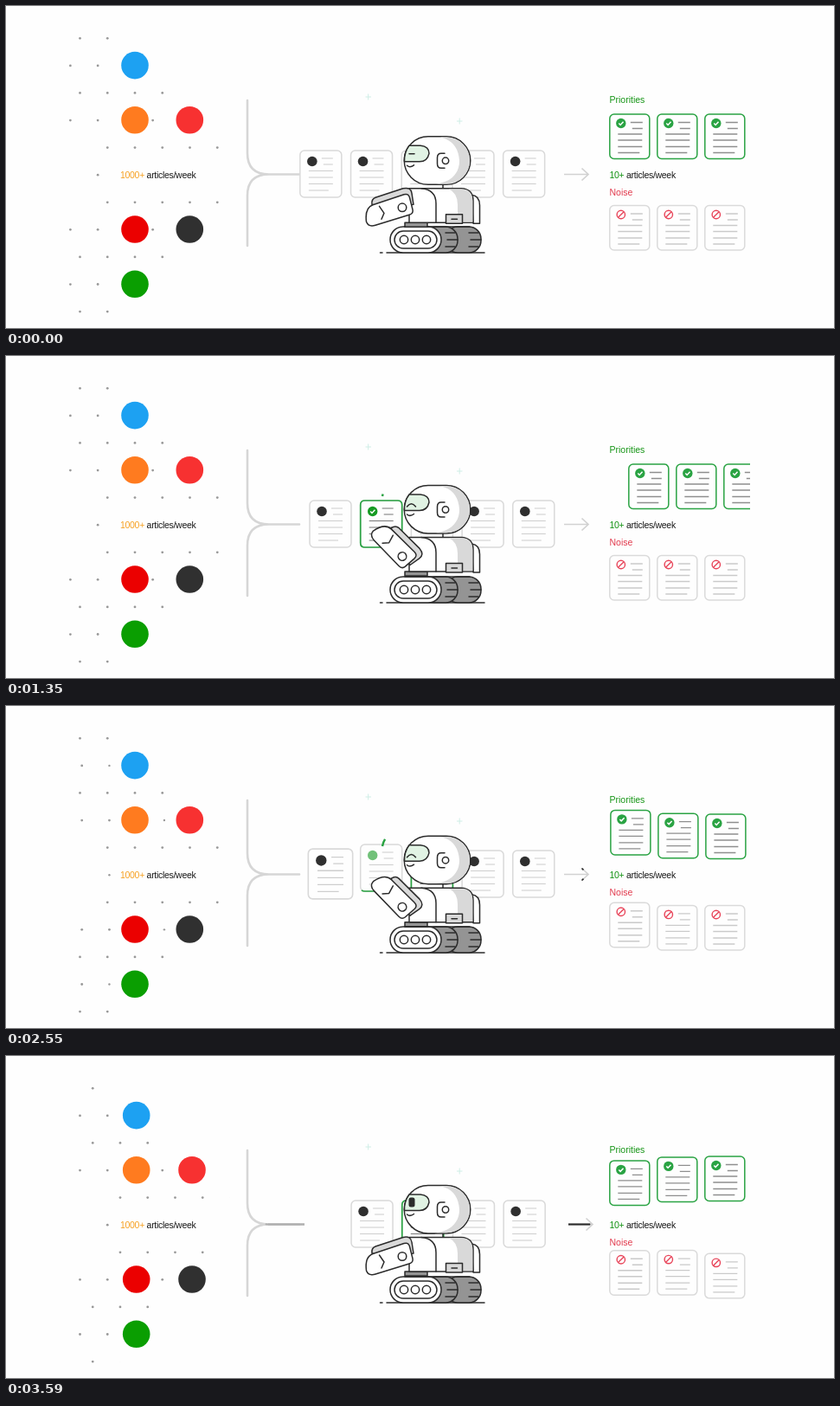
These frames come from a looping animation (957x372 px, 3.69 s). An HTML page:

```html
<!DOCTYPE html>
<html lang="en">
<head>
<meta charset="utf-8">
<title>Article sorting robot</title>
<style>
html, body { margin: 0; width: 100%; height: 100%; overflow: hidden; background: #fefefe; }
svg { display: block; width: 957px; height: 372px; }
text { font: 10.5px "Liberation Sans", Arial, sans-serif; }
.count { letter-spacing: -.3px; fill: #1a1a1a; }
.ink { stroke: #2b2b2b; stroke-width: 1.5; stroke-linejoin: round; stroke-linecap: round; fill: none; }
.white { fill: #fff; }
.grey { fill: #d9d9d9; }
.dark { fill: #949494; }
.shade { fill: #d9d9d9; stroke: none; }
.line { fill: none; }
</style>
</head>
<body>
<svg viewBox="0 0 957 372">
  <defs><clipPath id="edge"><rect x="680" y="90" width="180" height="110"/></clipPath></defs>

  <g id="dots" fill="#999"></g>
  <g id="sources"></g>

  <text class="count" x="132" y="199"><tspan fill="#f7a325">1000+</tspan> articles/week</text>
  <text x="697.5" y="112" fill="#149414">Priorities</text>
  <text class="count" x="697.5" y="199"><tspan fill="#149414">10+</tspan> articles/week</text>
  <text x="697.5" y="219" fill="#e23b4e">Noise</text>

  <path class="line" stroke="#d6d6d6" stroke-width="2.6" stroke-linecap="round"
    d="M279 109V170Q279 194.5 304 194.5H339M279 277V219Q279 194.5 304 194.5H339"/>
  <g id="inflow" class="line" stroke="#b0b0b0" stroke-width="2">
    <path d="M279 108V170Q279 194.5 304 194.5H345"/>
    <path d="M279 278V219Q279 194.5 304 194.5H345"/>
  </g>
  <g id="arrow" class="line" stroke-width="1.7">
    <path stroke="#d2d2d2" d="M645 194.5H673M665.5 187.5L673 194.5L665.5 201.5"/>
    <g id="outflow" stroke="#2b2b2b">
      <path d="M645 194.5H673L665.5 187.5"/>
      <path d="M645 194.5H673L665.5 201.5"/>
    </g>
  </g>
  <path stroke="#cfeee6" d="M415.5 105H422M418.7 101.5V108.5M521 133H527.5M524.2 129.5V136.5"/>

  <g id="belt"></g>
  <path id="beam" class="line" stroke="#2aa343" stroke-width="2.5" pathLength="1"
    d="M435 162C437 152 442 147.5 452 147.5H471"/>

  <g id="robot">
    <path class="ink" d="M440 285H553M432.5 285H435"/>
    <g id="treads"></g>
    <rect class="ink white" x="444" y="255" width="59" height="30" rx="15"/>
    <rect class="ink white" x="449" y="260" width="49" height="20" rx="10"/>
    <g class="ink"><circle cx="460" cy="270" r="4.7"/><circle cx="473" cy="270" r="4.7"/><circle cx="486" cy="270" r="4.7"/></g>
    <path class="ink" d="M461 255H536"/>
    <g id="upper">
      <rect class="ink dark" x="461" y="249" width="26" height="5"/>
      <path class="ink white" d="M538 217Q547.5 218 547.5 229V250H540Z"/>
      <path class="ink white" d="M466 249V209.5H526Q540 210 540 224V249Z"/>
      <path class="shade" d="M512 210.2H526Q539.3 210 539.3 224V248.3H522V228Q522 215 512 210.2Z"/>
      <path class="ink" d="M480 209.5Q497 211 497 227V249M505 205V209"/>
      <rect class="ink grey" x="508.5" y="239.5" width="19" height="10.5"/>
      <path class="ink" d="M515 245H521.5"/>
      <g id="arm">
        <path class="ink grey" d="M423 228Q422 222 427 220L459 209.5Q468 207.5 469 215L471 228L440 232Z"/>
        <path class="ink white" d="M424 228.5L460 216.5Q465 215 466.500 220L470 234Q471 238.500 466 240L427 252Q419 254.500 416.500 248Q414.500 232 424 228.5Z"/>
        <path class="ink" d="M431.5 230L437 238L434 245"/>
        <circle class="ink" cx="458" cy="231.5" r="4.800"/>
      </g>
      <path class="ink white" d="M488 149.5H509A27.75 27.75 0 0 1 509 205H488A27.75 27.75 0 0 1 488 149.5Z"/>
      <path class="shade" d="M502 150.2H509A27 27 0 0 1 509 204.3H497C516 202 524.5 190 524 177C523 162 515 153 502 150.2Z"/>
      <path class="ink" style="fill:#e1f3e4" d="M466 160H479Q489 161 489 169Q487 178.5 478 178.5H460.5Q460 168 466 160Z"/>
      <path class="ink" d="M463.5 183Q467 186 471.5 182.5M507 169H503Q498.5 169 498.5 174V181Q498.5 186 503 186H507"/>
      <circle class="ink white" cx="508" cy="177.5" r="3.7"/>
      <path id="blink" class="ink" d="M466 169.5H472"/>
      <rect id="pupil" fill="#2b2b2b" x="465.5" y="163.5" width="7" height="11" rx="2.5"/>
      <path id="smile" class="ink" d="M463.5 174Q468.5 167.5 473.5 174"/>
    </g>
  </g>

  <g id="keep" clip-path="url(#edge)"></g>
  <g id="noise"></g>
</svg>

<script>
const LOOP = 3690, CYCLE = 1465, START = 350;
const SCANS = [880, 2500];
const NS = 'http://www.w3.org/2000/svg';
const $ = id => document.getElementById(id);

function set(el, attrs) {
  for (const key in attrs) el.setAttribute(key, attrs[key]);
}
function add(parent, tag, attrs, html = '') {
  const el = document.createElementNS(NS, tag);
  set(el, attrs);
  el.innerHTML = html;
  return parent.appendChild(el);
}
const show = (el, on) => set(el, { opacity: +on });

const clamp = v => Math.max(0, Math.min(1, v));
const progress = (t, from, to) => clamp((t - from) / (to - from));
const ease = (t, from, to) => .5 - .5 * Math.cos(Math.PI * progress(t, from, to));
function cubic(t, from, to) {
  const u = progress(t, from, to);
  return u < .5 ? 4 * u ** 3 : 1 - 4 * (1 - u) ** 3;
}
function backOut(t, from, to) {
  const v = progress(t, from, to) - 1;
  return 1 + 2.7 * v ** 3 + 1.7 * v ** 2;
}

// Time within the conveyor cycle; the loop opens late in a finished one.
const cycleIndex = t => Math.floor((t - START) / CYCLE);
const phaseOf = t => t < START ? t + 1350 : t - cycleIndex(t) * CYCLE;

// Source dots and circles
const PITCH = 31.75;
const dots = [];
for (let row = 0; row < 11; row++) {
  const away = Math.abs(row - 5);
  const first = away < 2 ? 1 : 0;
  const last = away ? 5 - 2 * Math.floor(away / 2) : 1;
  for (let col = first - 1; col <= last; col++) {
    dots.push({ row, col, first, last, el: add($('dots'), 'circle', { cy: 37.3 + 31.58 * row }) });
  }
}
const sources = [
  [0, 1, '#1da1f2'], [0, 3, '#ff7b1f'], [1, 3, '#f73131'],
  [0, 7, '#eb0000'], [1, 7, '#303030'], [0, 9, '#0a9e01']
].map(([side, row, fill]) => ({
  side, el: add($('sources'), 'circle', { cy: 37 + 31.58 * row, r: 15.8, fill })
}));

function drawSources(t) {
  const phase = phaseOf(t);
  const shifts = [ease(phase, START, 1000), ease(phase, 980, 1600)].map(e => PITCH * (e % 1));
  for (const { row, col, first, last, el } of dots) {
    const x = 85.5 + PITCH * col + shifts[row % 2];
    const fromFirst = x - 85.5 - PITCH * first, pastLast = x - 85.5 - PITCH * last;
    set(el, { cx: x, r: 1.4 * clamp((fromFirst + 15) / 4) * clamp(1 - pastLast / 15) });
  }
  const nudge = ease(phase, START, 650) - ease(phase, 700, 980);
  for (const { side, el } of sources) set(el, { cx: 149 + 63.3 * side + nudge * (1.7 + side) });
}

// Pulses along the bracket and the arrow
function dash(group, tail, head) {
  const from = Math.max(0, tail);
  for (const path of group.children) {
    set(path, { 'stroke-dasharray': `0 ${from} ${Math.max(0, head - from)} 400` });
  }
}
function drawFlow(t) {
  const phase = phaseOf(t);
  const head = 1.1 * (phase - 530);
  dash($('inflow'), head - 45, head);
  dash($('outflow'), 40 * ease(phase, 850, 1150), 40 * ease(phase, 520, 760));
  const push = 5 * (ease(phase, 450, 650) - ease(phase, 750, 1000));
  set($('arrow'), { transform: `translate(${push})` });
}

// Cards on the belt, drawn around their centre
const CHECK = 'M-2.5 0L-.7 1.9L2.7 -1.7';
const belt = [];
for (let slot = 4; slot >= -3; slot--) {
  const el = add($('belt'), 'g', {}, `
    <rect x="-24" y="-27" width="48" height="54" rx="5" fill="#fefefe" stroke="#d9d9d9" stroke-width="1.5"/>
    <path class="line" stroke="#2aa343" stroke-width="1.7" pathLength="1"
      d="M16 27H-19Q-24 27 -24 22V-22Q-24 -27 -19 -27H19Q24 -27 24 -22V22Q24 27 19 27Z"/>
    <path class="line" stroke-width="1.2" d="M1 -18H14M3 -11H14M-14 -3.5H14M-14 4H14M-14 11.5H14M-14 19H9"/>
    <circle cx="-10" cy="-14.5" r="5.8" fill="#2f2f2f"/>
    <g transform="translate(-10 -14.5)"><circle r="5.7" fill="#159a22"/>
      <path class="line" stroke="#fff" stroke-width="1.5" d="${CHECK}"/></g>`);
  const [, outline, lines, badge, mark] = el.children;
  belt.push({ slot, el, outline, lines, badge, mark });
}
const traced = p => ease(p, 0, 170);

function drawBelt(t) {
  const move = cycleIndex(t) + ease(phaseOf(t), 480, 730) - .19 * (1 - ease(t, 0, 250));
  for (const { slot, el, outline, lines, badge, mark } of belt) {
    const x = 351 + 58.7 * (slot + move);
    const pop = slot < 0 ? backOut(t + (slot + 1) * CYCLE, 720, 1220) : 1;
    const scale = pop * clamp(1 - (x - 588) / 22);
    const p = t - (SCANS[-slot] ?? LOOP * 2);
    const lift = 7 * (ease(p, -150, 50) - ease(p, 50, 350));
    const fade = 1 - ease(p, 1800, 2150);
    const marked = p > -50 && fade > 0, checked = marked && p > 350;
    set(el, { transform: `translate(${x + 24} ${194 - lift}) scale(${scale})` });
    set(outline, { 'stroke-dasharray': `${traced(p)} 2`, opacity: fade });
    set(lines, { stroke: marked && p > 100 ? '#777' : '#cecece' });
    show(badge, !marked);
    set(mark, { opacity: checked ? 1 : marked ? .6 : 0 });
    show(mark.lastElementChild, checked);
  }
  const beam = SCANS.reduce((sum, s) => sum + traced(t - s) - ease(t - s, 300, 500), 0);
  set($('beam'), { 'stroke-dasharray': `${beam} 2` });
}

// Robot
for (const x of [508, 481]) {
  add($('treads'), 'g', { transform: `translate(${x} 255)` }, `
    <rect class="ink dark" width="41" height="30" rx="14"/>
    <path class="ink" d="M27 7H38M29 15H41M27 23H38"/>`);
}
function drawRobot(t) {
  const phase = phaseOf(t), working = t >= START;
  const reach = working ? ease(phase, 720, 950) - ease(phase, 1690, 1850) : 0;
  const bob = 1.3 * (1 - ease(t, 0, 250)) + .7 * (ease(phase, 800, 1050) - ease(phase, 1080, 1350));
  set($('upper'), { transform: `translate(0 ${bob})` });
  set($('arm'), { transform: `rotate(${63 * reach} 458 231.5)` });
  const blink = t < 150;
  const smile = working && phase >= 900 && phase < 1670;
  show($('blink'), blink);
  show($('smile'), smile);
  show($('pupil'), !blink && !smile);
}

// Sorted cards
function sortedCard(parent, edge, lines, mark) {
  return add(parent, 'g', {}, `
    <rect x="-23" y="-26" width="46" height="51.5" rx="5" fill="#fefefe" stroke="${edge}" stroke-width="1.5"/>
    <path class="line" stroke="${lines}" stroke-width="1.3" d="M1 -16.5H15M3 -9.5H15M-13.5 -3H14.5M-13.5 4H14.5M-13.5 11.5H14.5M-13.5 18.5H11.5"/>
    <g transform="translate(-10 -15.5)">${mark}</g>`);
}
const tick = `<circle r="5.7" fill="#2aa343"/><path class="line" stroke="#fff" stroke-width="1.5" d="${CHECK}"/>`;
const ban = '<g class="line" stroke="#e8455a" stroke-width="1.4"><circle r="4.7"/><path d="M-3.3 3.3L3.3 -3.3"/></g>';
const keep = [2, 1, 0, -1, -2].map(i => ({ i, el: sortedCard($('keep'), '#2aa343', '#8e8e8e', tick) }));
const noise = [0, 1, 2].map(i => ({ i, el: sortedCard($('noise'), '#dadada', '#cacaca', ban) }));

// A slow swell that passes from card to card
const swell = (t, delay) => Math.sin(Math.PI * progress(t, 1830 + delay, 4710 + delay)) ** 2;
const slide = t => cubic(t, 830, 1950);

function drawSorted(t) {
  const shift = slide(t) + slide(t - 1530);
  for (const { i, el } of keep) {
    const born = i < 0 ? SCANS[-i - 1] + 500 : -LOOP;
    const x = 720.8 + 55 * (i + shift), y = 151 - 9.2 * swell(t, 450 * (i + 1));
    set(el, { transform: `translate(${x} ${y}) scale(${backOut(t, born, born + 550)})` });
  }
  for (const { i, el } of noise) {
    set(el, { transform: `translate(${720.8 + 55 * i} ${256.5 - 6.5 * swell(t, 600 * i)})` });
  }
}

// The picture holds on a 150 ms beat, with a shorter end.
function beat(t) {
  return t >= 3590 ? 3590 : t >= 3440 ? 3440 : Math.floor(t / 150) * 150;
}
let shown = -1;
function frame() {
  const t = beat(performance.now() % LOOP);
  if (t !== shown) {
    shown = t;
    for (const draw of [drawSources, drawFlow, drawBelt, drawRobot, drawSorted]) draw(t);
  }
  requestAnimationFrame(frame);
}
frame();
</script>
</body>
</html>
```
